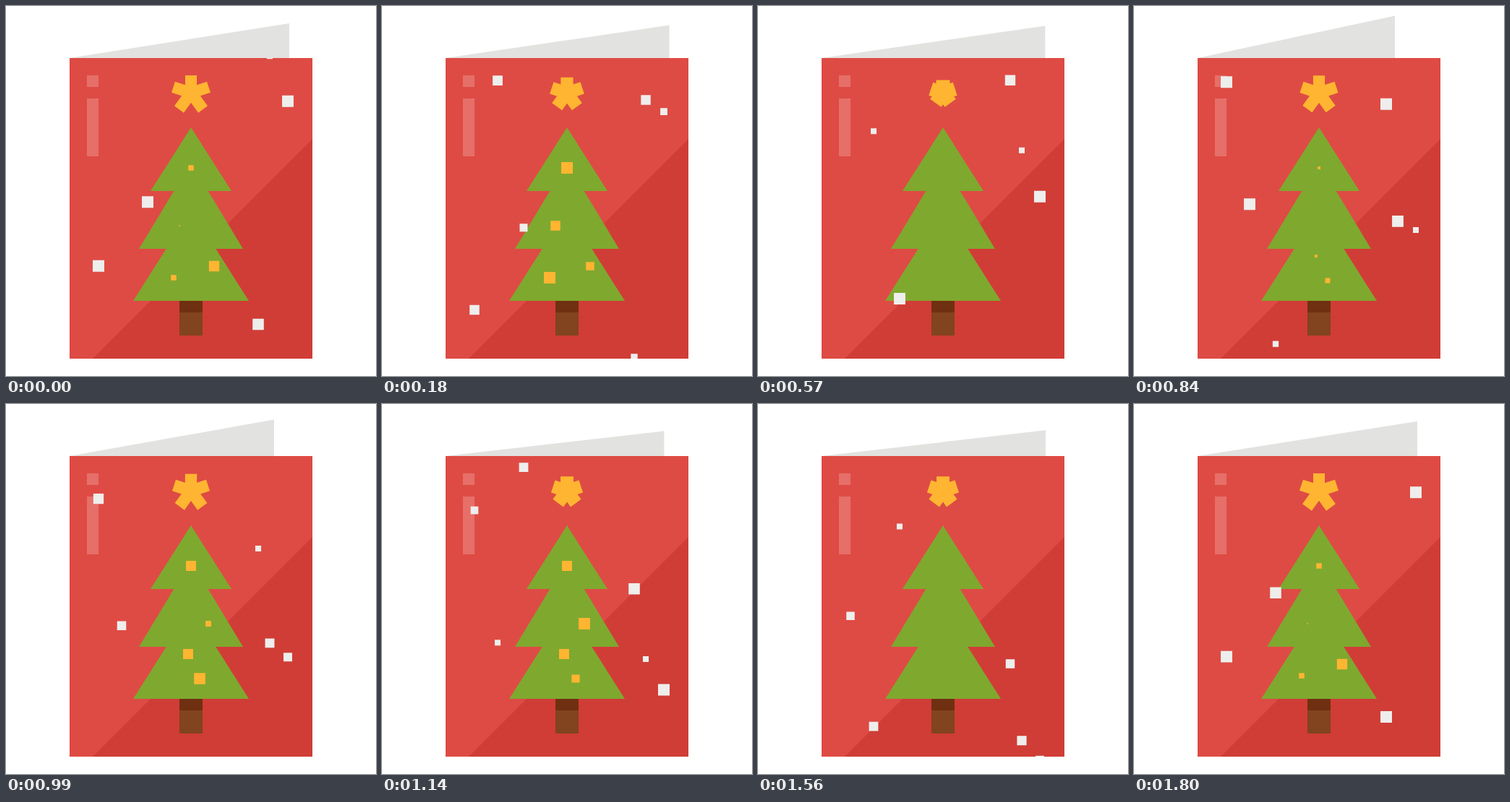
An HTML page that plays this animation: 512x512 px, repeating every 1830 ms.

```html
<!DOCTYPE html>
<html lang="en">
<head>
<meta charset="utf-8">
<title>Christmas card</title>
<style>
  html, body { margin: 0; width: 100%; height: 100%; overflow: hidden; background: #fff; }
  svg { display: block; width: 100%; height: 100%; }
</style>
</head>
<body>
<svg viewBox="0 0 512 512">
  <clipPath id="cardClip"><path d="M88 72H424V488H88z"/></clipPath>
  <path id="flap" fill="#e2e2e0"/>
  <path fill="#de4b44" d="M88 72H424V488H88z"/>
  <path fill="#d03d36" d="M424 184V488H120z"/>
  <path fill="#e66f69" d="M112 96h16v16h-16zM112 128h16v80h-16z"/>
  <path fill="#82431f" d="M240 408h32v48h-32z"/>
  <path fill="#6f3011" d="M240 408h32v16h-32z"/>
  <path fill="#7fa82f" d="M256 168L312 256H279.700L328 336H290.300L336 408H176L221.700 336H184L232.300 256H200z"/>
  <path id="star" fill="none" stroke="#ffb531"/>
  <path id="lights" fill="#ffb531"/>
  <path id="snow" fill="#eeeeec" clip-path="url(#cardClip)"/>
</svg>
<script>
const FRAME = 30, COUNT = 61, CYCLE = 60, TAU = 2 * Math.PI;

// Resting poses of the flap, eased from one to the next
const poses = [
  { at: 1, w: 304, h: 48 },
  { at: 14.5, w: 322, h: 39.6 },
  { at: 28, w: 273, h: 58.5 },
  { at: 44, w: 316, h: 23.5 },
  { at: 60, w: 304, h: 48 }
];

// Tree lights: x, y, frame of full size
const lights = [
  [256, 224, 5.7], [232, 376, 5.7], [240, 304, 8.8], [288, 360, 2.2],
  [256, 224, 35.5], [252, 346, 35.5], [268, 380, 34], [280, 304, 38.5]
];

// Snow: x, frame and height of the pause, speed, pulse length
const flakes = [
  [390, 5, 147, 7.4, 19.2], [196, 47.8, 160, 7.5, 19.2], [160, 15, 165, 7.5, 19.2],
  [365, 15.3, 194, 7.3, 19.2], [349, 23, 115, 8.5, 10.7], [128, 33.5, 131, 8.5, 33]
];

const el = id => document.getElementById(id);
const flap = el("flap"), star = el("star"), lightPath = el("lights"), snow = el("snow");
const mix = (a, b, t) => a + (b - a) * t;
const ease = t => {
  t = Math.min(1, Math.max(0, t));
  return t * t * (3 - 2 * t);
};
const square = (x, y, s) => `M${x - s / 2} ${y - s / 2}h${s}v${s}h${-s}z`;

function drawFlap(f) {
  const i = Math.max(1, poses.findIndex(p => f <= p.at));
  const a = poses[i - 1], b = poses[i];
  const t = ease((f - a.at) / (b.at - a.at));
  flap.setAttribute("d", `M88 72L${88 + mix(a.w, b.w, t)} ${72 - mix(a.h, b.h, t)}V72z`);
}

// Five arms that shrink and thicken every 30 frames; lower ones reach further
function drawStar(f) {
  const open = ease(Math.abs(f % 30 - 15) / 15);
  let d = "";
  for (let i = 0; i < 5; i++) {
    const a = i * TAU / 5 - TAU / 4, c = Math.cos(a), s = Math.sin(a);
    const reach = mix(15.6 - 0.7 * s, 26.4 + 2.1 * s, open);
    d += `M256 120.200l${reach * c} ${reach * s}`;
  }
  star.setAttribute("d", d);
  star.setAttribute("stroke-width", mix(19.5, 16, open));
}

function drawLights(f) {
  let d = "";
  for (const [x, y, peak] of lights) {
    const away = Math.min(Math.abs(f - peak), Math.abs(f - CYCLE - peak));
    const size = 16 * ease(1 - away / 11);
    if (size > 0.4) d += square(x, y, size);
  }
  lightPath.setAttribute("d", d);
}

// Steady fall with a fading sway that makes each flake pause once
function drawSnow(f) {
  let d = "";
  for (const [x, pause, height, speed, pulse] of flakes) {
    for (const lap of [-COUNT, 0, COUNT]) {
      const u = f + lap - pause;
      const sway = 28 * Math.exp(-Math.abs(u) / 20) * Math.sin(u * TAU / 20);
      const y = height + speed * u - sway;
      const size = 12 + 4 * Math.cos((u + 5.6) * TAU / pulse);
      if (y > 60 && y < 500) d += square(x, y, size);
    }
  }
  snow.setAttribute("d", d);
}

function draw(ms) {
  const f = Math.floor(ms / FRAME) % COUNT;
  drawFlap(f);
  drawStar(f);
  drawLights(f % CYCLE);
  drawSnow(f);
}

const begin = performance.now();
function tick() {
  draw(performance.now() - begin);
  requestAnimationFrame(tick);
}
tick();
</script>
</body>
</html>
```
